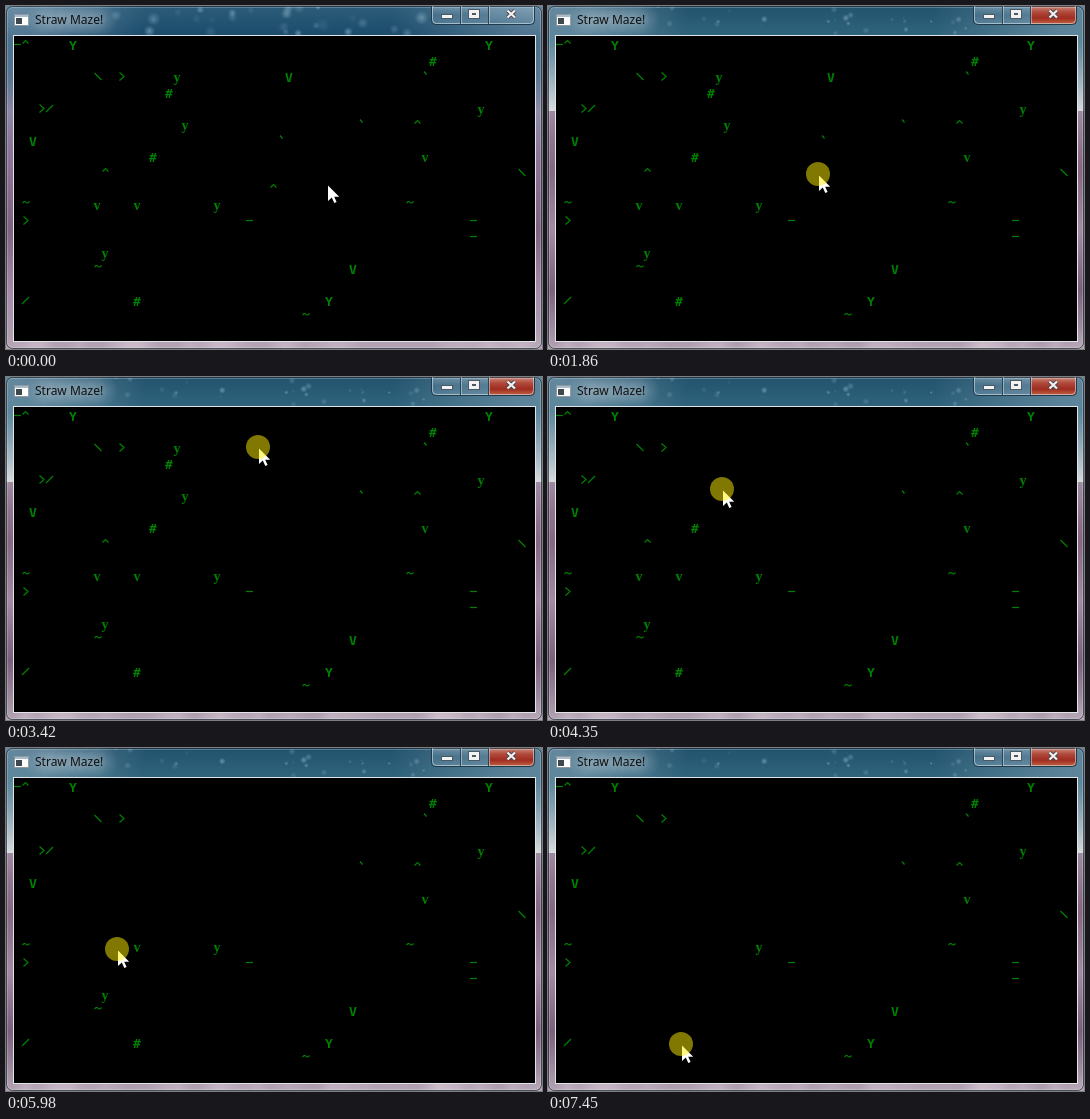
Write an HTML page with a canvas that moves like this. It is 536 px wide and 343 px high and loops after 8000 ms.

```html
<!DOCTYPE html>
<html lang="en">
<head>
<meta charset="utf-8">
<title>Straw Maze!</title>
<style>
html, body { margin: 0; width: 100%; height: 100%; overflow: hidden; background: #000; }
canvas { display: block; }
</style>
</head>
<body>
<canvas id="stage" width="536" height="343"></canvas>
<script>
const W = 536, H = 343, LOOP = 8000, PRESS = 980, REACH = 12, HORIZON = 105;
const ctx = document.getElementById('stage').getContext('2d');

// One string per console row: column, then character.
const rows = [
  '0- 1^ 7Y 59Y', '52#', '10\\ 13> 20y 34V 51`', '19#', '3> 4/ 58y',
  '21y 43` 50^', '2V 33`', '17# 51v', '11^ 63\\', '32^',
  '1~ 10v 15v 25y 49~', '1> 29- 57-', '57-', '11y', '10~ 42V', '',
  '1/ 15# 39Y', '36~'
];

// Blades are pen strokes inside an 8 by 16 cell; the other plants are letters.
const blades = {
  '-': 'M0 7.5H7',
  '^': 'M.5 6.5 3.5 3.5 6.5 6.5',
  '\\': 'M.5 4 7.5 11',
  '/': 'M0 11 7 4',
  '>': 'M1.5 3.5 6 7.5 1.5 11.5',
  '`': 'M2 2.5 4.5 5.5',
  '~': 'M.5 6 2 4.5H3L5 6H6L7.5 4.5'
};
for (const ch in blades) blades[ch] = new Path2D(blades[ch]);
const arrowPath = new Path2D('M0 0V15.5L3.8 12 6.3 17.5 8.6 16.5 6.2 11.2H11.2Z');

// Each leg of the pointer's walk: start, end, then where it arrives.
const home = [321, 178];
const legs = [
  [70, 540, 311, 192], [940, 980, 270, 184], [1860, 1860, 270, 168],
  [1860, 2060, 282, 135], [2220, 2580, 276, 124], [2730, 3110, 284, 70],
  [3340, 3420, 252, 70], [3420, 3900, 178, 70], [3900, 4140, 166, 88],
  [4200, 4350, 174, 112], [4350, 4970, 142, 151], [5040, 5270, 88, 171],
  [5620, 5750, 93, 202], [5900, 5980, 111, 201], [5980, 6160, 137, 199],
  [6160, 6670, 94, 256], [6740, 7220, 142, 297], [7450, 7450, 133, 296]
];

const clamp = v => Math.max(0, Math.min(1, v));

function pointer(t) {
  let [x, y] = home;
  for (const [start, end, toX, toY] of legs) {
    if (t < start) break;
    const k = end > start ? clamp((t - start) / (end - start)) : 1;
    x += (toX - x) * k;
    y += (toY - y) * k;
  }
  return [Math.round(x), Math.round(y)];
}

function eatenAt(x, y) {
  for (let t = PRESS; t < LOOP; t += 10) {
    const [px, py] = pointer(t);
    if (Math.hypot(px - x - 4, py - y - 8) < REACH) return t;
  }
  return Infinity;
}

const plants = rows.flatMap((row, r) => row.split(' ').filter(Boolean).map(s => {
  const x = 8 + 8 * parseInt(s), y = 31 + 16 * r;
  return { x, y, ch: s.slice(-1), end: eatenAt(x, y) };
}));

function random(seed) {
  return () => (seed = seed * 16807 % 2147483647) / 2147483647;
}

function fill(color, x, y, w, h) {
  ctx.fillStyle = color;
  ctx.fillRect(x, y, w, h);
}

// Evenly spaced colours from top to bottom.
function shade(colors, x, y, w, h) {
  const g = ctx.createLinearGradient(0, y, 0, y + h);
  colors.forEach((color, i) => g.addColorStop(i / (colors.length - 1), color));
  fill(g, x, y, w, h);
}

function disc(x, y, r, color) {
  ctx.fillStyle = color;
  ctx.beginPath();
  ctx.arc(x, y, r, 0, 7);
  ctx.fill();
}

// A soft round light.
function glow(x, y, r, rgb, alpha) {
  const g = ctx.createRadialGradient(x, y, 0, x, y, r);
  g.addColorStop(0, `rgba(${rgb},${alpha})`);
  g.addColorStop(1, `rgba(${rgb},0)`);
  disc(x, y, r, g);
}

const idle = {
  sky: ['#2c5c79', '#18496a', '#3d5f7e', '#8a80a0'],
  field: ['#8a80a0', '#8e7095', '#80617f', '#a58aa6', '#b3a3b2'],
  close: ['rgba(200,220,235,.3)', 'rgba(150,180,200,.15)'],
  seed: 71, size: 5
};
const active = {
  sky: ['#23536d', '#31667f', '#8ba4b2', '#dcdcdc'],
  field: ['#9b8199', '#87677f', '#a38aa2', '#7c5f7b', '#b3a3b2'],
  close: ['#d08f82', '#b04a3c', '#a02c20', '#c0603f'],
  seed: 23, size: 2.5
};

function glass({ sky, field, close, seed, size }) {
  shade(sky, 0, 0, W, HORIZON);
  shade(field, 0, HORIZON, W, H - HORIZON);
  const rnd = random(seed);
  for (let i = 0; i < 30; i++) {
    glow(110 + rnd() * 310, rnd() * 28, (.5 + rnd()) * size, '170,205,225', rnd() * .5);
    glow(rnd() * W, H - 4, 10 + rnd() * 20, '235,220,230', rnd() * .3);
  }
  glow(10, 0, 130, '200,215,228', .4);
  glow(W, 0, 150, '190,205,220', .4);
  shade(['rgba(200,220,235,.4)', 'rgba(110,145,170,.25)', 'rgba(150,180,200,.3)'], 426, 0, 57, 18);
  shade(close, 483, 0, 45, 18);
}

function outline(color, inset, radius) {
  ctx.strokeStyle = color;
  ctx.beginPath();
  ctx.roundRect(inset, inset, W - 2 * inset, H - 2 * inset, radius);
  ctx.stroke();
}

function buttons() {
  ['#203a4c', 'rgba(215,228,236,.6)'].forEach((color, i) => {
    ctx.strokeStyle = color;
    ctx.beginPath();
    ctx.roundRect(425.5 + i, -3, 103 - 2 * i, 21.5 - i, 4);
    ctx.stroke();
  });
  [454, 482].forEach(x => {
    fill('#2b4557', x, 0, 1, 18);
    fill('rgba(215,228,236,.5)', x + 1, 0, 1, 18);
  });
  fill('#4a5963', 435, 8, 12, 5);
  fill('#f2f2f2', 436, 9, 10, 3);
  fill('#4a5963', 462, 3, 12, 10);
  fill('#f2f2f2', 463, 4, 10, 8);
  fill('#4a5963', 466, 7, 4, 2);
  const cross = new Path2D('M501.5 4.5 509 11.5M509 4.5 501.5 11.5');
  [['#4a4750', 4], ['#f2f2f2', 2.2]].forEach(([color, width]) => {
    ctx.strokeStyle = color;
    ctx.lineWidth = width;
    ctx.stroke(cross);
  });
}

function frame() {
  ctx.lineWidth = 1;
  outline('rgba(25,40,50,.7)', .5, 6);
  outline('rgba(235,242,246,.25)', 1.5, 5);
  buttons();

  fill('#8d98a0', 8, 8, 15, 12);
  fill('#fff', 9, 9, 13, 10);
  fill('#a9bccb', 9, 9, 13, 2);
  fill('#3d474e', 10, 12, 6, 6);

  for (let x = 35; x < 105; x += 10) glow(x, 14, 17, '225,232,238', .22);
  ctx.fillStyle = '#111';
  ctx.font = '12px "Noto Sans", sans-serif';
  ctx.fillText('Straw Maze!', 29, 18);

  fill('#dfe5e9', 7, 29, 523, 307);
  fill('#000', 8, 30, 521, 305);
}

function plant({ x, y, ch }) {
  if (blades[ch]) {
    ctx.save();
    ctx.translate(x, y);
    ctx.stroke(blades[ch]);
    ctx.restore();
  } else {
    ctx.font = 'yv'.includes(ch)
      ? 'bold 14px "Liberation Serif", serif'
      : 'bold 13px "DejaVu Sans Mono", monospace';
    ctx.fillText(ch, x + 3, y + 13);
  }
}

function arrow(x, y) {
  ctx.save();
  ctx.translate(x, y);
  ctx.lineWidth = 1;
  ctx.strokeStyle = '#000';
  ctx.fillStyle = '#fff';
  ctx.stroke(arrowPath);
  ctx.fill(arrowPath);
  ctx.restore();
}

function draw(t) {
  glass(idle);
  if (t >= 70) {
    // Both layers are opaque enough to blend as the window gains focus.
    ctx.globalAlpha = clamp((t - 10) / 530);
    glass(active);
    ctx.globalAlpha = 1;
  }
  frame();

  ctx.fillStyle = ctx.strokeStyle = '#008000';
  ctx.lineWidth = 1.2;
  ctx.textAlign = 'center';
  plants.filter(p => t < p.end).forEach(plant);
  ctx.textAlign = 'left';

  const [x, y] = pointer(t);
  arrow(x + 1, y + 1.5);
  if (t >= PRESS) disc(x, y, 12, 'rgba(255,240,0,.5)');
}

function tick() {
  draw(performance.now() % LOOP);
  requestAnimationFrame(tick);
}
tick();
</script>
</body>
</html>
```
